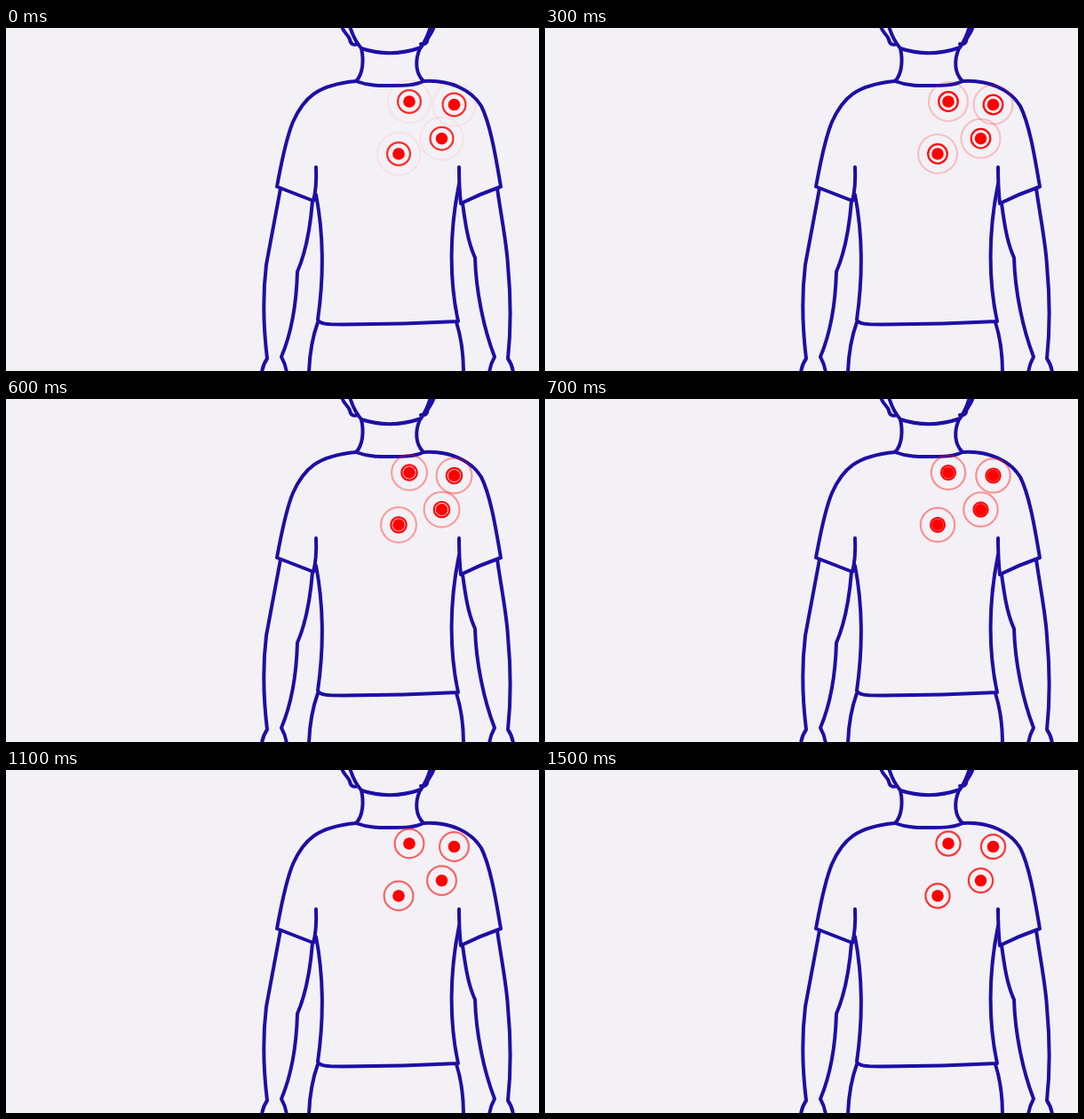
These frames come from a looping animation (600 px wide and 387 px high, 1600 ms). An HTML page:

```html
<!DOCTYPE html>
<html lang="en">
<head>
<meta charset="utf-8">
<title>Upper back pain</title>
<style>
  html, body { margin: 0; width: 100%; height: 100%; overflow: hidden; background: #f3f1f5; }
  svg { display: block; width: 100%; height: 100%; }
</style>
</head>
<body>
<svg viewBox="0 0 600 387">
  <g fill="none" stroke="#1e0ea5" stroke-width="4" stroke-linecap="round" stroke-linejoin="round">
    <!-- head and neck -->
    <path d="M387-2Q392 14 400 23Q433 34 467 22Q474 12 478-2"/>
    <path d="M378-2C380 6 386 8 387 13C388 18 391 20 396 18M482-2C479 8 474 10 474 15Q472 19 467 18"/>
    <path d="M400 23C403 36 402 52 394 60C410 66 424 65 435 65C447 65 460 65 470 60C461 51 460 37 466 23"/>
    <!-- shirt -->
    <path d="M394 60C350 64 335 79 323 106C314 128 309 158 305 179L346 195Q350 180 349 157"/>
    <path d="M470 60C500 58 524 70 535 88C546 110 552 150 557 179Q534 187 512 198Q510 180 510 157"/>
    <path d="M349 188C357 230 358 280 351 329C353 334 360 334.5 380 334.5Q450 334 509 331C499 285 499 230 510 176"/>
    <!-- arms -->
    <path d="M309 181L293 267C289 300 290 340 294 373Q289 380 288 389M345 195C343 220 338 252 328 275C327 310 321 345 310 371Q315 380 316 389"/>
    <path d="M553 181C557 210 564 245 565 268C568 300 569 335 565 373Q570 380 571 389M514 198C517 220 520 242 528 259C529 297 538 340 550 371Q545 380 544 389"/>
    <!-- hips -->
    <path d="M351 332Q342 357 341 389M507 332Q515 357 515 389"/>
  </g>
  <g id="spots" fill="none" stroke="#f00" stroke-width="2.2"></g>
</svg>
<script>
  const LOOP = 1600, STEP = 100;
  const spots = document.getElementById('spots');
  const rings = [];

  function circle(cx, cy, attrs) {
    const el = document.createElementNS('http://www.w3.org/2000/svg', 'circle');
    for (const [name, value] of Object.entries({ cx, cy, ...attrs })) el.setAttribute(name, value);
    return spots.appendChild(el);
  }

  for (const [x, y] of [[454, 83], [504.5, 86.5], [490.5, 124.7], [442, 142]]) {
    for (const delay of [0, LOOP]) rings.push({ el: circle(x, y), delay });
    circle(x, y, { r: 6.8, fill: '#f00', stroke: 'none' });
  }

  // Each ring shrinks into its dot over two loops, growing more opaque.
  function draw(now) {
    const time = Math.floor(now % LOOP / STEP) * STEP;
    for (const { el, delay } of rings) {
      const age = (time + delay) / 1000;
      el.setAttribute('r', Math.max(0, 24.1 - 7 * age));
      el.setAttribute('opacity', Math.min(1, 0.06 + 0.48 * age));
    }
    requestAnimationFrame(draw);
  }
  draw(performance.now());
</script>
</body>
</html>
```
